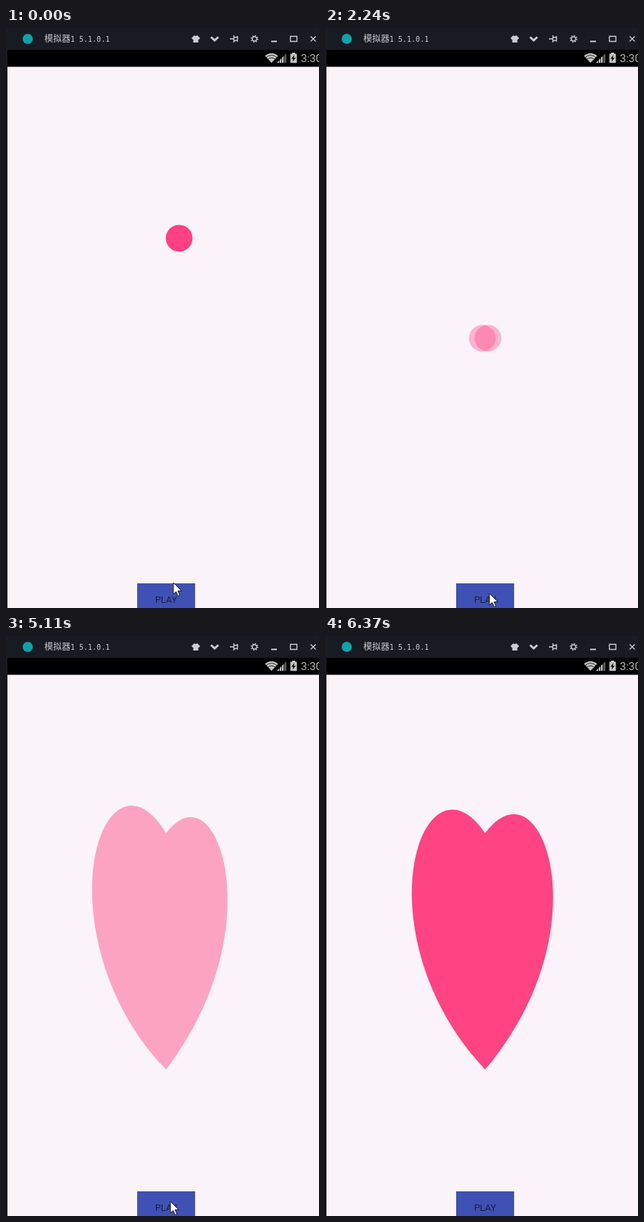
An HTML page for the animation above (6440 ms loop, 432x800 px).

```html
<!DOCTYPE html>
<html lang="zh">
<head>
<meta charset="utf-8">
<title>Heart animation</title>
<style>
  html, body { margin: 0; width: 100%; height: 100%; overflow: hidden; background: #faf3f7; }
  svg { display: block; width: 432px; height: 800px; }
  .line { fill: none; stroke: #c9cbce; stroke-width: 1.4; }
  .solid { fill: #c9cbce; }
</style>
</head>
<body>
<svg viewBox="0 0 432 800">
  <rect width="432" height="800" fill="#faf3f7"/>

  <path id="heart" fill="#ff4081"/>
  <g fill="#ff4081">
    <circle id="ballA" r="18.3"/>
    <circle id="ballB" r="18.3"/>
  </g>

  <rect x="181" y="766" width="80" height="34" fill="#3f51b5"/>
  <text x="221" y="792.5" text-anchor="middle" font-family="Roboto, sans-serif" font-size="12.8" fill="#1b1f3d">PLAY</text>

  <!-- window frame and title bar -->
  <rect width="2" height="800" fill="#1b1c20"/>
  <rect width="432" height="30" fill="#191b22"/>
  <circle cx="30" cy="15" r="7" fill="#0fa3a8"/>
  <text x="53" y="19" font-size="12" font-family="'Noto Sans CJK SC', 'Noto Sans CJK', sans-serif" fill="#c9cbce">模拟器</text>
  <text x="89" y="19" font-size="10" font-family="'DejaVu Sans Mono', monospace" fill="#c9cbce" xml:space="preserve">1 5.1.0.1</text>

  <path class="solid" d="M256 14L260 10Q262 12 264 10L268 14L266 16H265.500V20H258.500V16H258Z"/>
  <path class="line" style="stroke-width:3" d="M283 12.500L288 17L293 12.500"/>
  <path class="line" d="M309 15H314M314.500 10V20M315 12.500L319.500 13V17L315 17.500M319.500 13V11M319.500 17V19"/>
  <circle class="line" cx="343" cy="15" r="3"/>
  <circle class="line" cx="343" cy="15" r="4.600" stroke-dasharray="1.600 2.013"/>
  <path class="line" style="stroke-width:2" d="M366 18.500H374"/>
  <path class="line" d="M392.500 11.500H401.500V18.500H392.500Z"/>
  <path class="line" d="M420.500 11.500L427.500 18.500M427.500 11.500L420.500 18.500"/>

  <!-- status bar -->
  <rect x="2" y="30" width="430" height="23.500" fill="#000"/>
  <path fill="#c4c4c4" d="M357.500 38.500Q366.500 31 375.500 38.500L366.500 48Z"/>
  <path fill="none" stroke="#000" stroke-width=".8" d="M358.500 41Q366.500 34 374.500 41M361 43.500Q366.500 38.500 372 43.500"/>
  <path fill="#555" d="M374 48L387 35V48Z"/>
  <path fill="#c4c4c4" d="M374 48L384 38V48Z"/>
  <path stroke="#000" stroke-width=".8" d="M377.500 36V48M380.500 36V48M383.500 36V48"/>
  <path fill="#c4c4c4" d="M392.500 35.500H395V34H399V35.500H401.500V48H392.500Z"/>
  <path fill="#000" d="M398 37L394 42.500H396.500L395.500 46.500L400 41H397.300Z"/>
  <text x="407" y="47" font-family="Roboto, sans-serif" font-size="15" fill="#b9b9b9">3:30</text>

  <path id="cursor" d="M0 0V16L3.800 12.400L6.500 18.500L9 17.400L6.300 11.500H11.500Z" fill="#fff" stroke="#1a1a1a" stroke-width="1"/>
</svg>
<script>
const LOOP = 6440, STEP = 70;
const BALLS = { start: 480, duration: 3000 };
const HEART = { start: 3778, duration: 2860 };
const CENTER = { x: 221, y: 435 }, DEPTH = 348, SAMPLES = 48;

const [heart, ballA, ballB, cursor] =
  ['heart', 'ballA', 'ballB', 'cursor'].map(id => document.getElementById(id));

const clamp = v => Math.min(1, Math.max(0, v));
const progress = (t, { start, duration }) =>
  (1 - Math.cos(Math.PI * clamp((t - start) / duration))) / 2;
const cubic = (t, a, b, c, d) => {
  const u = 1 - t;
  return u * u * u * a + 3 * u * u * t * b + 3 * u * t * t * c + t * t * t * d;
};

// a point of the outline, turned about the vertical axis in perspective
function heartPoint(t, side, angle) {
  const x = side * cubic(t, 0, 82.5, 172, 0);
  const y = cubic(t, 272, 156.6, 407, 598) - CENTER.y;
  const scale = DEPTH / (DEPTH - x * Math.sin(angle));
  const px = CENTER.x + x * Math.cos(angle) * scale;
  return px.toFixed(2) + ' ' + (CENTER.y + y * scale).toFixed(2);
}

function drawHeart(f) {
  const angle = 2 * Math.PI * f, points = [];
  for (let i = 0; i <= SAMPLES; i++) points.push(heartPoint(i / SAMPLES, 1, angle));
  for (let i = SAMPLES; i > 0; i--) points.push(heartPoint(i / SAMPLES, -1, angle));
  heart.setAttribute('d', 'M' + points.join('L') + 'Z');
  heart.setAttribute('opacity', f);
}

function drawBalls(f) {
  const spread = cubic(f, 0, 283, -172, 0);
  const x = 239 - 10.8 * f - 27.6 * f * f;
  const y = 290 + 178 * f + 62 * f * f;
  [[ballA, -1], [ballB, 1]].forEach(([ball, side]) => {
    ball.setAttribute('cx', x + side * spread);
    ball.setAttribute('cy', y);
    ball.setAttribute('opacity', 1 - f);
  });
}

// time, x, y of the pointer tip
const POINTER = [
  [0, 231, 765], [350, 227, 780], [5110, 227, 780],
  [5530, 293, 776], [5810, 330, 804], [LOOP, 330, 804]
];

function drawCursor(t) {
  const i = POINTER.findIndex(p => p[0] > t);
  const [t0, x0, y0] = POINTER[i - 1], [t1, x1, y1] = POINTER[i];
  const k = (t - t0) / (t1 - t0);
  cursor.setAttribute('transform', `translate(${x0 + (x1 - x0) * k} ${y0 + (y1 - y0) * k})`);
}

function render(t) {
  drawBalls(progress(t, BALLS));
  drawHeart(progress(t, HEART));
  drawCursor(t);
}

const start = performance.now();
function tick() {
  const t = (performance.now() - start) % LOOP;
  render(Math.floor(t / STEP) * STEP);
  requestAnimationFrame(tick);
}
tick();
</script>
</body>
</html>
```
